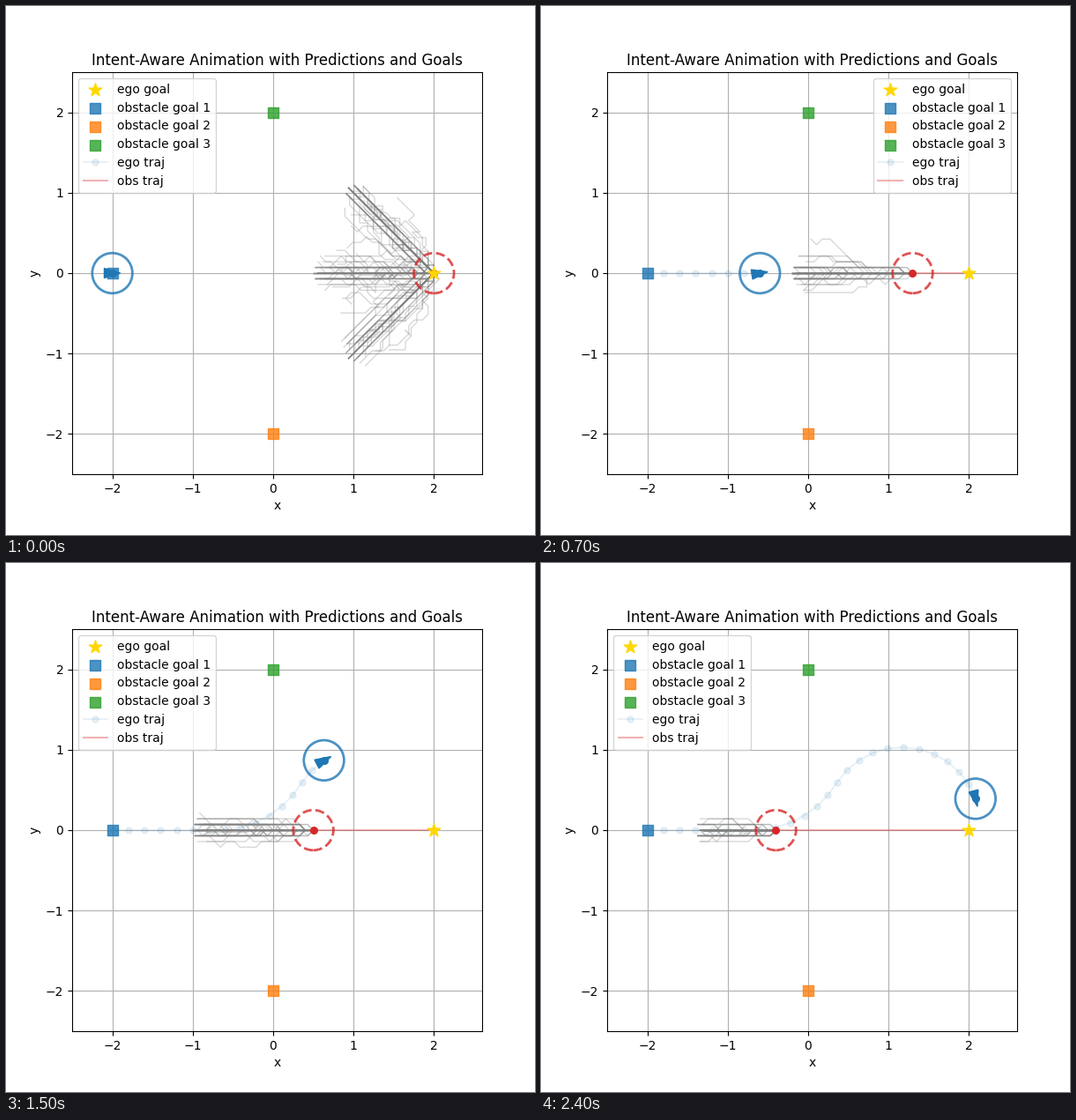
Write a matplotlib script that moves like this. It is 600x600 px and loops after 2.5 s.

```python
import numpy as np
import matplotlib.pyplot as plt
from matplotlib.animation import FuncAnimation
from matplotlib.patches import Circle

FRAMES, STEP, HORIZON = 25, 0.1, 15
RADIUS = 0.25
EGO_GOAL = (2, 0)
GOALS = [(-2, 0), (0, -2), (0, 2)]
COLORS = ["tab:blue", "tab:orange", "tab:green"]

k = np.arange(FRAMES)
obs = np.column_stack([2 - STEP * k, 0 * k])

# Ego drives straight, veers left, then turns right at a steady rate.
heading = np.radians(np.interp(k, [6, 12.4, 24], [0, 58, -76]))
direction = np.column_stack([np.cos(heading), np.sin(heading)])
speed = np.where(k < 7, 0.2, 0.195)
ego = (-2, 0) + np.cumsum(direction * speed[:, None], axis=0)
ego = np.vstack([(-2, 0), ego[:-1]])

angles = np.arange(8) * np.pi / 4
ACTIONS = STEP * np.column_stack([np.cos(angles), np.sin(angles)])


def rollout(rng, start, goal, beta):
    """Noisily rational walk towards a goal over eight directions."""
    path = [start]
    for _ in range(HORIZON):
        options = path[-1] + ACTIONS
        gain = -np.hypot(*(options - goal).T) / STEP
        p = np.exp(beta * (gain - gain.max()))
        path.append(options[rng.choice(8, p=p / p.sum())])
        x, y = path[-1]
        if x < -1.27 - 0.5 * abs(y):
            break
    return np.array(path)


def predictions(i):
    """Sampled obstacle paths; belief in the side goals fades quickly."""
    rng = np.random.default_rng(40 + i)
    side = 0.3 ** i / 3
    count, low = (150, 1.8) if i == 0 else (60, 5)
    for _ in range(count):
        goal = GOALS[rng.choice(3, p=[1 - 2 * side, side, side])]
        yield rollout(rng, obs[i], goal, rng.uniform(low, 14))


def draw_agent(center, color, style):
    ax.plot(*center, "o", color=color, ms=5.5, zorder=3)
    ax.add_patch(Circle(center, RADIUS, fill=False, ec=color, ls=style,
                        lw=2, alpha=0.8, zorder=3))


def draw(i):
    ax.clear()
    ax.set(xlim=(-2.5, 2.6), ylim=(-2.5, 2.5), aspect="equal",
           xlabel="x", ylabel="y",
           title="Intent-Aware Animation with Predictions and Goals")
    ax.grid(True)

    ax.scatter(*EGO_GOAL, marker="*", s=120, color="gold", zorder=4,
               label="ego goal")
    for n, (goal, color) in enumerate(zip(GOALS, COLORS), 1):
        ax.scatter(*goal, marker="s", s=80, color=color, alpha=0.8, zorder=3,
                   label=f"obstacle goal {n}")

    ax.plot(*ego[:i + 1].T, "o-", color="tab:blue", ms=5, alpha=0.1,
            label="ego traj")
    ax.plot(*obs[:i + 1].T, color="tab:red", alpha=0.35, label="obs traj")
    for path in predictions(i):
        ax.plot(*path.T, color="gray", lw=1, alpha=0.3)

    draw_agent(ego[i], "tab:blue", "-")
    draw_agent(obs[i], "tab:red", "--")
    ax.arrow(*ego[i], *(0.1 * direction[i]), head_width=0.12, head_length=0.2,
             length_includes_head=True, color="tab:blue", zorder=3)

    # Keep the legend clear of the upper paths.
    crowded = i < 2 or i >= 15
    ax.legend(loc="upper left" if crowded else "upper right")
    return ax.get_children()


fig, ax = plt.subplots(figsize=(6, 6), dpi=100)
anim = FuncAnimation(fig, draw, frames=FRAMES, init_func=lambda: [],
                     interval=100, repeat=True, repeat_delay=0)
plt.show()
```
